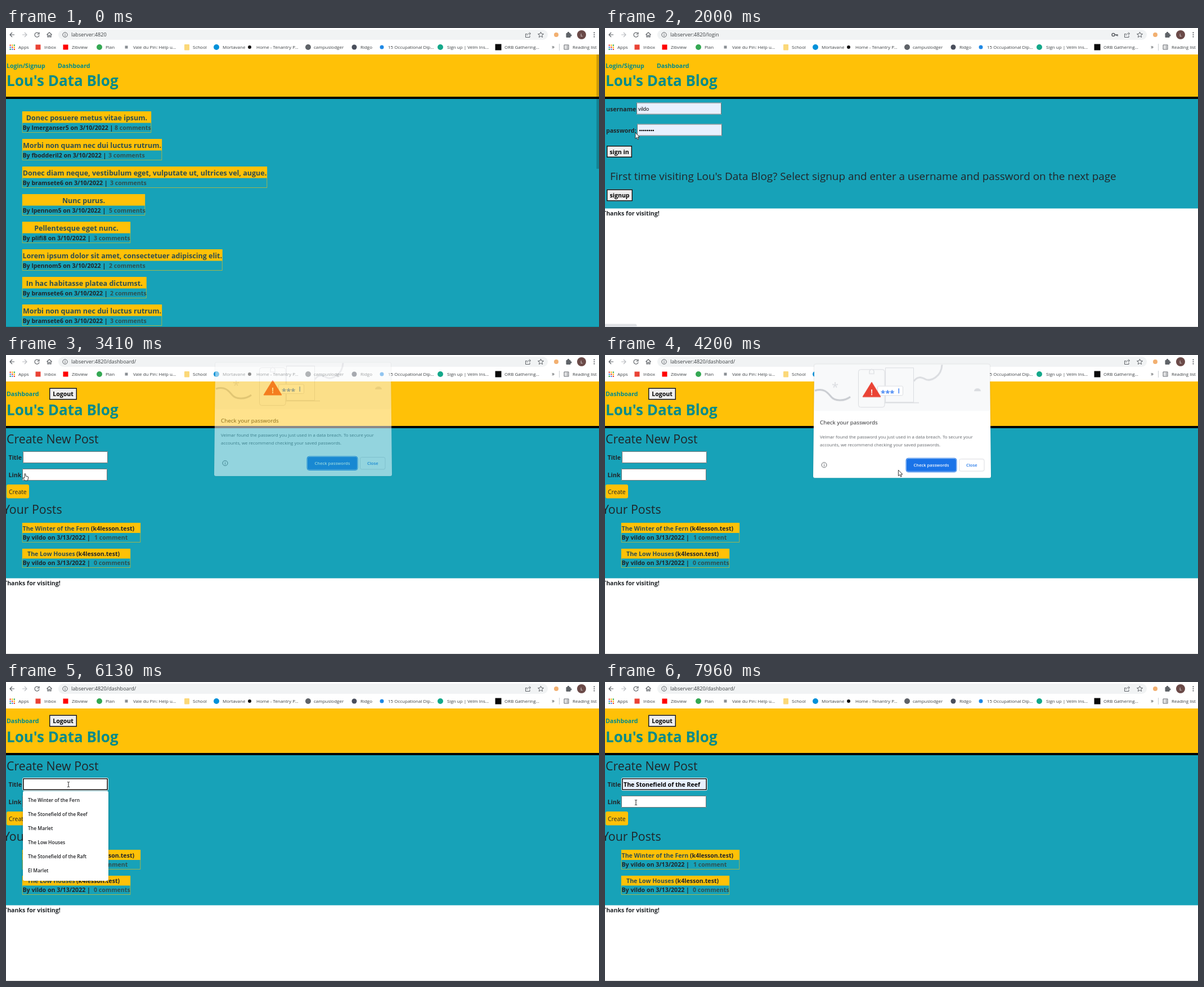
Write an HTML page with a canvas that moves like this. It is 1054x531 px and loops after 8000 ms.

```html
<!DOCTYPE html>
<html lang="en">
<head>
<meta charset="utf-8">
<title>Blog walkthrough</title>
<style>
  html, body { margin: 0; width: 100%; height: 100%; overflow: hidden; background: #fff; }
  canvas { display: block; }
</style>
</head>
<body>
<canvas id="stage" width="1054" height="531"></canvas>
<script>
const screen2d = document.getElementById('stage').getContext('2d');
const layer = document.createElement('canvas');
layer.width = 1054;
layer.height = 531;
const layer2d = layer.getContext('2d');
let ctx = screen2d;

const LOOP = 8000, LOGIN_AT = 1470, DASH_AT = 3010;
const GOLD = '#ffc107', TEAL = '#17a2b8', LINK = '#008b8b', INK = '#212529', SLATE = '#2f4f4f', GREY = '#5f6368';
const SANS = '"Open Sans", "Noto Sans", sans-serif', ARIAL = '"Liberation Sans", sans-serif';
const HOST = 'labserver:4820', BLOG = "Lou's Data Blog", SITE = '(k4lesson.test)', USER = 'vildo';
const BODY = 10.6;

const between = (t, a, b) => t >= a && t < b;
const clamp = v => Math.max(0, Math.min(1, v));

function rect(x, y, w, h, fill, r = 0) {
  ctx.fillStyle = fill;
  ctx.beginPath();
  ctx.roundRect(x, y, w, h, r);
  ctx.fill();
}
function frame(x, y, w, h, color, line = 1, r = 0) {
  ctx.strokeStyle = color;
  ctx.lineWidth = line;
  ctx.beginPath();
  ctx.roundRect(x + line / 2, y + line / 2, w - line, h - line, r);
  ctx.stroke();
}
function dot(x, y, r, fill) {
  ctx.fillStyle = fill;
  ctx.beginPath();
  ctx.arc(x, y, r, 0, 7);
  ctx.fill();
}
function path(d, x, y, stroke, line = 1.2, fill) {
  const p = new Path2D(d);
  ctx.save();
  ctx.translate(x, y);
  if (fill) { ctx.fillStyle = fill; ctx.fill(p); }
  if (stroke) { ctx.strokeStyle = stroke; ctx.lineWidth = line; ctx.stroke(p); }
  ctx.restore();
}
function text(s, x, y, size = BODY, color = INK, weight = 700, align = 'left', family = SANS) {
  ctx.font = `${weight} ${size}px ${family}`;
  ctx.fillStyle = color;
  ctx.textAlign = align;
  ctx.fillText(s, x, y);
}

// Browser bars
const bookmarks = [
  ['Apps', 22], ['Inbox', 68, 57, '#ea4335', 1, 4.5], ['Zibview', 117, 106, '#f00', 1, 4.5], ['Plan', 177, 166, '#34a853'],
  ['Vale du Pin: Help u...', 226, 214, '#8a8f94', 1, 2.5], ['School', 332], ['Mortavane', 385, 374, '#0091da'],
  ['Home - Tenantry P...', 445, 433, '#111', 0, 3], ['campuslodger', 547, 537, '#5f6368'],
  ['Ridgo', 630, 619, '#4a4f5c', 0, 4.5], ['15 Occupational Dip...', 679, 668, '#1e88e5', 0, 3.5],
  ['Sign up | Velm Ins...', 784, 772, '#14a88a'], ['ORB Gathering...', 886, 875, '#0a0a0a', 1, 5.5]
];
const appColors = ['#ea4335', '#fbbc04', '#34a853', '#4285f4'];

function browser(t, page) {
  rect(0, 0, 1054, 47, '#fff');
  rect(93, 3, 870, 18, '#f1f3f4', 9);
  path('M4 0H-4M0 -4L-4 0L0 4', 11, 12, GREY);
  path('M-4 0H4M0 -4L4 0L0 4', 33, 12, '#b9bcc0');
  if (between(t, 1260, 1530) || between(t, 2870, 3080)) path('M-4 -4L4 4M4 -4L-4 4', 55, 12, GREY, 1.3);
  else path('M3.2 -2.4A4 4 0 1 0 4 1M4 -4.6V-1H.4', 55, 12, GREY);
  path('M-4.5 0L0 -4.2L4.5 0M-3 -1V4H-1V1H1V4H3V-1', 77, 12, GREY);
  path('M4.2 0A4.2 4.2 0 1 1 -4.2 0A4.2 4.2 0 1 1 4.2 0M0 -.6V2.4M0 -2.4V-1.3', 105, 12, GREY, 1);
  const paths = ['', '/login', '/dashboard/'];
  text(HOST + paths[page], 116, 15.4, 9.1, '#3c4043', 400);
  if (page === 1) {
    path('M0 0A2.5 2.5 0 1 1 -5 0A2.5 2.5 0 1 1 0 0H5V2.5M3 0V2', 906, 12, GREY, 1.5);
  }
  path('M-2 -2H-4.5V4H3V1M-2 1C-2 -2 0 -2.5 4 -2.5M2 -5L4.5 -2.5L2 0', 928, 12.5, GREY, 1);
  path('M0 -5L1.4 -1.6L5 -1.3L2.2 1L3.1 4.5L0 2.6L-3.1 4.5L-2.2 1L-5 -1.3L-1.4 -1.6Z', 950.5, 12, GREY, 1);
  dot(978, 12, 4, '#f2b071');
  rect(995.5, 9, 8, 8, GREY, 1);
  dot(999.5, 8.7, 1.9, GREY);
  dot(1003.8, 13, 1.8, GREY);
  dot(1023, 12, 8, '#6b4a48');
  text('L', 1023, 15, 8, '#fff', 400, 'center');
  for (let i = -1; i < 2; i++) dot(1045.5, 12 + i * 3.6, 1.1, GREY);

  for (let i = 0; i < 9; i++) rect(6.5 + i % 3 * 3.6, 29.5 + Math.floor(i / 3) * 3.6, 2.3, 2.3, appColors[i % 4]);
  rect(317, 29, 9, 10.5, '#fbd879', 1);
  for (const [name, x, iconX, color, square, r = 5] of bookmarks) {
    if (color && square) rect(iconX - r, 34 - r, r * 2, r * 2, color);
    else if (color) dot(iconX, 34, r, color);
    text(name, x, 37.2, 8, '#3c4043', 400);
  }
  text('»', 970, 37, 10, '#3c4043', 400);
  rect(983, 28, 1, 12, '#c9ccd0');
  frame(991.5, 29.5, 9, 9, GREY);
  path('M-2.5 -2H-1.3M0 -2H3M-2.5 0H-1.3M0 0H3M-2.5 2H-1.3M0 2H3', 996, 34, GREY, .8);
  text('Reading list', 1007, 37.2, 8, '#3c4043', 400);
}

// Page parts
function banner(bottom, titleY) {
  rect(0, 47, 1054, bottom - 47, GOLD);
  rect(0, bottom, 1054, 4, '#000');
  text(BLOG, 1, titleY, 26, LINK);
}
function nav(t) {
  const hover = between(t, 760, LOGIN_AT);
  text('Login/Signup', 1, 71, BODY, hover ? '#0056b3' : LINK);
  if (hover) rect(1, 72.3, 71, 1, '#0056b3');
  text('Dashboard', 92, 71, BODY, LINK);
}
function field(x, y, fill = '#fff') {
  rect(x, y, 151, 21, fill);
  frame(x, y, 151, 21, '#767676');
}
function button(label, x, y, w) {
  rect(x, y, w, 21, '#efefef');
  frame(x, y, w, 21, '#111', 1.4);
  text(label, x + w / 2, y + 14.5, BODY, '#000', 700, 'center');
}
function card(y, right, gold, h, byline, commentX, comments) {
  rect(29, y, right - 29, gold, GOLD);
  frame(28.7, y, right - 28.4, h, 'rgba(255,193,7,.6)');
  text(byline + ' |', 29.5, y + h - 5, BODY, INK);
  text(comments, commentX, y + h - 5, BODY, SLATE);
}
function footer(y) {
  rect(0, y, 1054, 531 - y, '#fff');
  text('Thanks for visiting!', -4, y + 12.5, BODY, INK);
}

const posts = [
  ['Donec posuere metus vitae ipsum.', 'lmerganser5', 8, 258, 193],
  ['Morbi non quam nec dui luctus rutrum.', 'fbodderil2', 3, 277, 182],
  ['Donec diam neque, vestibulum eget, vulputate ut, ultrices vel, augue.', 'bramsete6', 3, 464, 185],
  ['Nunc purus.', 'lpennom5', 5, 247, 183],
  ['Pellentesque eget nunc.', 'plifi8', 3, 221, 156],
  ['Lorem ipsum dolor sit amet, consectetuer adipiscing elit.', 'lpennom5', 2, 384.5, 183],
  ['In hac habitasse platea dictumst.', 'bramsete6', 2, 249.5, 185],
  ['Morbi non quam nec dui luctus rutrum.', 'bramsete6', 3, 277, 185]
];

function home(t) {
  banner(122, 102.5);
  nav(t);
  posts.forEach(([title, author, count, right, commentX], i) => {
    const y = 148 + i * 49;
    card(y, right, 20.5, 38, `By ${author} on 3/10/2022`, commentX, count + ' comments');
    text(title, (29 + right) / 2, y + 16.3, 12.53, SLATE, 700, 'center');
  });
  rect(1049.5, 47, 4.5, 203, 'rgba(0,0,0,.2)');
}

function login(t) {
  banner(122, 102.5);
  nav(t);
  text('username', 2, 147.5);
  field(56, 132.5, '#e8f0fe');
  text(USER, 59, 147, 9.3, '#000', 400, 'left', ARIAL);
  text('password:', 2, 185.5);
  field(57, 170.5, '#e8f0fe');
  for (let i = 0; i < 8; i++) dot(62.3 + i * 3.35, 182, 1.3, '#000');
  button('sign in', 3, 209, 45);
  text(`First time visiting ${BLOG}? Select signup and enter a username and password on the next page`,
    9, 269.5, 18.9, INK, 500);
  button('signup', 3, 286.5, 46);
  footer(320.5);
}

const titles = ['The Winter of the Fern', 'The Stonefield of the Reef', 'The Marlet', 'The Low Houses',
  'The Stonefield of the Raft', 'El Marlet'];

function dashboard(t) {
  banner(126, 106.5);
  text('Dashboard', 1, 73, BODY, LINK);
  button('Logout', 77, 58.5, 49);
  text('Create New Post', 1, 157.3, 21.3, INK, 500);

  const focused = t >= 5580, filled = t >= 7560;
  const hover = between(t, 7150, 7560) ? (t < 7260 ? 0 : 1) : -1;
  text('Title', 4.5, 185.5);
  field(30, 171, filled || hover >= 0 ? '#e8f0fe' : '#fff');
  if (focused) {
    frame(29, 170, 153, 23, '#fff', 1, 2);
    frame(30, 171, 151, 21, '#101010', 1.6, 1);
  }
  if (filled) text(titles[1], 33, 185.5, BODY, '#000');
  else if (hover >= 0) text(titles[hover], 33, 185, 9.3, '#000', 400, 'left', ARIAL);
  if (between(t, 5620, 6130) || between(t, 6660, 7150)) rect(33.5, 174, 1, 15, '#000');
  if (between(t, 7560, 7960)) rect(171.5, 174, 1, 15, '#000');

  text('Link', 4.5, 216.5);
  field(29, 202);
  rect(1, 230, 40, 24.5, GOLD, 3);
  text('Create', 5, 246.5, 10.4, INK, 400);
  text('Your Posts', -5, 282, 21.3, INK, 500);

  const byline = `By ${USER} on 3/13/2022`;
  card(298, 239, 18, 35, byline, 157, '1 comment');
  text(titles[0], 29.5, 311.5, BODY, SLATE);
  text(SITE, 151, 311.5, BODY, INK);
  card(344, 221, 17.5, 34, byline, 156, '0 comments');
  text(titles[3], 38, 357, BODY, SLATE);
  text(SITE, 125, 357, BODY, INK);
  footer(396.5);

  if (between(t, 5600, 7640)) {
    ctx.save();
    ctx.globalAlpha = clamp((t - 5560) / 130);
    ctx.shadowColor = 'rgba(0,0,0,.25)';
    ctx.shadowBlur = 4;
    rect(30, 193.5, 152, 159.5, '#fff', 3);
    ctx.shadowBlur = 0;
    if (hover >= 0) rect(30, 197.5 + hover * 25, 152, 25, '#ececec');
    titles.forEach((s, i) => text(s, 39, 213 + i * 25, 8.5, '#202124', 600));
    ctx.restore();
  }
}

function dialogBody(focusRing) {
  const pale = '#dadce0';
  ctx.save();
  ctx.shadowColor = 'rgba(0,0,0,.25)';
  ctx.shadowBlur = 2;
  path('M374 15.5H682Q684 15.5 684 18L686 214Q686 217 683 217H373Q370 217 370 214L372 18Q372 15.5 374 15.5Z', 0, 0, null, 0, '#fff');
  ctx.restore();
  rect(372, 15.5, 312, 82.5, '#f8f9fa', 3);

  frame(498, 21, 51, 62, pale);
  path('M497 83.5H558', 0, 0, pale, 1.5);
  frame(450, 24, 47.5, 68, pale, 1, 4);
  path('M470 32V27Q474 21 478 27V32Z', 0, 0, pale);
  path('M549 45C556 36 562 38 570 42S598 38 599 16', 0, 0, pale, 3);
  path('M373 62C390 57 396 66 402 73S424 82 436 73', 0, 0, '#c8cbd0', 3);
  text('*', 409, 63, 22, pale, 400, 'center');
  path('M656 63A6 5 0 0 1 668 63Z', 0, 0, null, 0, pale);
  rect(484, 53.5, 46, 17.5, '#fff', 2);
  frame(484, 53.5, 46, 17.5, pale, 1, 2);
  text('***', 490, 72, 15, '#4285f4', 700);
  rect(521.5, 58, 1.5, 9, '#4285f4');
  path('M474 47L490 73H458Z', 0, 0, '#ea4335', 1, '#ea4335');
  text('!', 474, 69.5, 15, '#fff', 600, 'center');

  text('Check your passwords', 382, 121.5, 9.85, '#202124', 400);
  text('Velmar found the password you just used in a data breach. To secure your', 382, 146.5, 7.9, GREY, 400);
  text('accounts, we recommend checking your saved passwords.', 382, 160.5, 7.9, GREY, 400);
  path('M4.5 0A4.5 4.5 0 1 1 -4.5 0A4.5 4.5 0 1 1 4.5 0M0 -.5V2.5M0 -2.5V-1.4', 389.5, 194, GREY, 1);
  rect(536, 183, 88, 22.5, '#1a73e8', 3);
  if (focusRing) frame(534.5, 181.5, 91, 25.5, '#1a73e8', 1, 4);
  text('Check passwords', 580, 197, 7.6, '#fff', 600, 'center');
  frame(629, 183, 45.5, 22.5, pale, 1, 3);
  text('Close', 651.7, 197, 7.6, '#1a73e8', 600, 'center');
}

// The password warning fades as one layer while it slides
function dialog(t) {
  const a = t < 3340 ? 0 : t < 4700 ? clamp(.3 + (t - 3340) / 300) : clamp(1 - (t - 4845) / 300);
  if (!a) return;
  ctx = layer2d;
  ctx.clearRect(0, 0, 1054, 531);
  dialogBody(t < 4700);
  ctx = screen2d;
  ctx.globalAlpha = a;
  ctx.drawImage(layer, 0, (a - .82) * 7);
  ctx.globalAlpha = 1;
}

function status(t) {
  if (!between(t, 930, 2300)) return;
  ctx.save();
  ctx.globalAlpha = clamp((t - 900) / 160);
  rect(-4, 525.5, t < LOGIN_AT ? 82.5 : 60.5, 10, '#dfe1e5', 3);
  ctx.restore();
}

// Pointer route: time, x, y
const route = [
  [180, 963, 500], [400, 622, 272], [790, 20, 66], [1860, 20, 66], [2000, 54, 186], [2460, 33, 211],
  [3990, 33, 211], [4000, 52, 225], [4340, 846, 190], [4620, 652, 190], [4810, 652, 190], [4900, 565, 186],
  [5140, 240, 184], [5450, 111, 182], [6800, 111, 182], [7150, 60, 215], [7300, 52, 233], [7580, 52, 233],
  [7700, 55, 214], [8000, 55, 214]
];

function pointer(t) {
  if (t < 180 || between(t, 3480, 4000)) return;
  const i = route.findIndex(p => p[0] > t);
  const [t0, x0, y0] = route[i - 1], [t1, x1, y1] = route[i];
  const u = (t - t0) / (t1 - t0), x = x0 + (x1 - x0) * u, y = y0 + (y1 - y0) * u;
  if (between(t, 5300, 6900) || t >= 7650) {
    path('M-2 -4.5Q0 -4.5 0 -3.5Q0 -4.5 2 -4.5M0 -3.5V3.5M-2 4.5Q0 4.5 0 3.5Q0 4.5 2 4.5', x, y, '#222', 1);
  } else if (between(t, DASH_AT, 3480)) {
    path('M0 0Q1.5 -1 2 1V4L6 5Q7 5.5 6.5 8L5.5 12H.5L-3 7.5Q-2.5 6 0 7.5Z', x, y, '#222', .9, '#fff');
  } else {
    path('M0 0V10.5L2.5 8.2L4.2 12L5.9 11.2L4.3 7.6H7.5Z', x, y, '#222', .9, '#fff');
  }
}

function draw() {
  const t = performance.now() % LOOP;
  const page = t < LOGIN_AT ? 0 : t < DASH_AT ? 1 : 2;
  rect(0, 0, 1054, 531, TEAL);
  browser(t, page);
  [home, login, dashboard][page](t);
  rect(0, 530, 1054, 1, 'rgba(0,0,0,.15)');
  status(t);
  dialog(t);
  pointer(t);
  requestAnimationFrame(draw);
}
draw();
</script>
</body>
</html>
```
